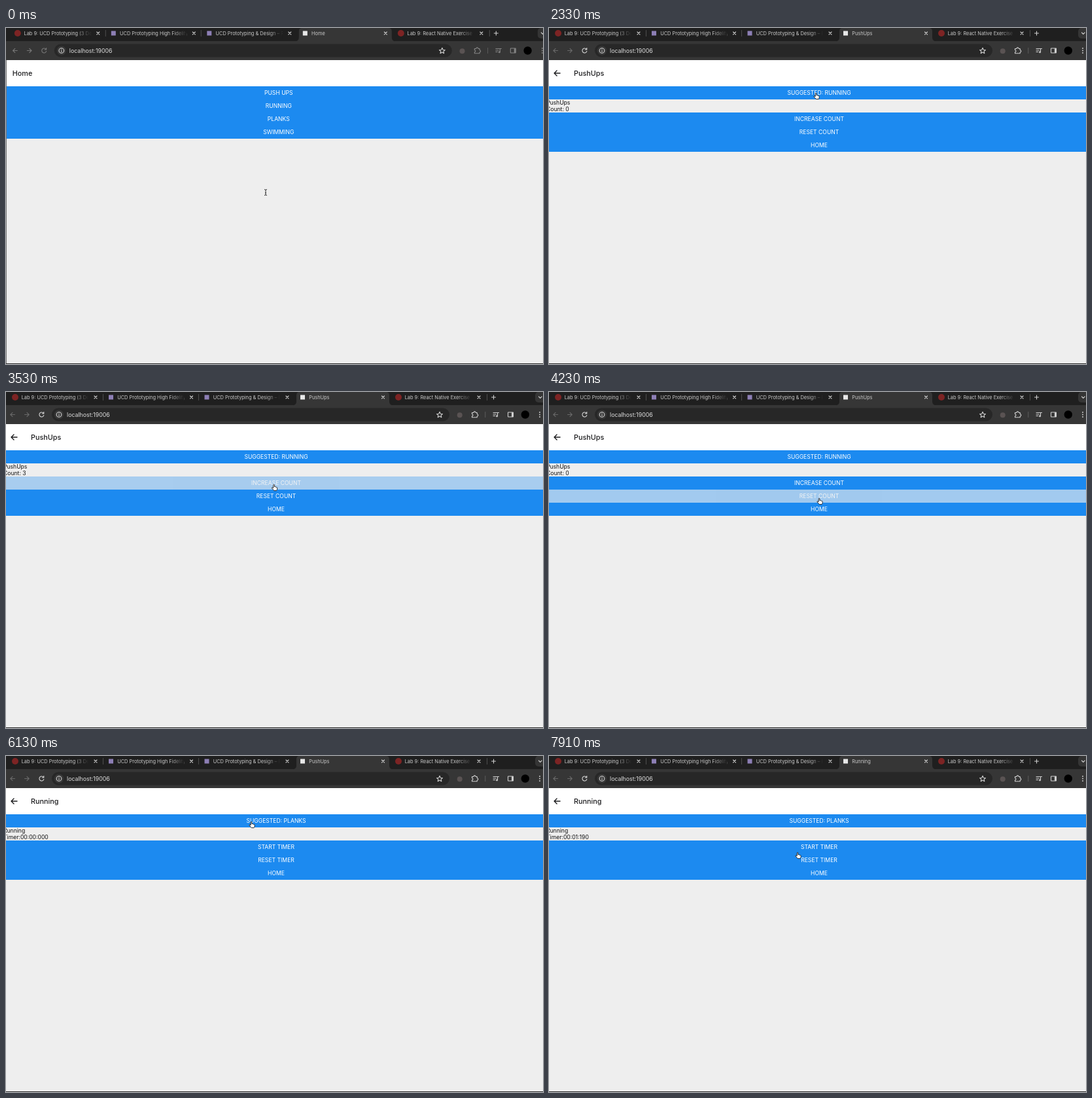
These frames come from a looping animation (821x513 px, 8 s). An HTML page:

```html
<!DOCTYPE html>
<html lang="en">
<head>
<meta charset="utf-8">
<title>Workout app</title>
<style>
  html, body { margin: 0; width: 100%; height: 100%; overflow: hidden; background: #eee; }
  svg { display: block; width: 821px; height: 513px; }
  text { font-family: Inter, Roboto, sans-serif; white-space: pre; }
  .tab { font-size: 7.4px; fill: #c9c9c9; }
  .url { font-size: 8.8px; fill: #dedede; }
  .head { font-size: 10.8px; font-weight: 500; fill: #1c1c1e; }
  .body { font-size: 8.6px; fill: #111; }
  .btn { font-size: 8.6px; fill: #fff; text-anchor: middle; }
  .line { fill: none; stroke: #d0d0d0; stroke-width: 1.1; stroke-linecap: round; stroke-linejoin: round; }
</style>
</head>
<body>
<svg viewBox="0 0 821 513" id="stage">
  <defs>
    <linearGradient id="fade">
      <stop offset="0" stop-color="#1f1f1f" stop-opacity="0"/>
      <stop offset="1" stop-color="#1f1f1f"/>
    </linearGradient>
  </defs>
  <rect width="821" height="513" fill="#eee"/>
  <rect width="821" height="21" fill="#1f1f1f"/>
  <rect y="20" width="821" height="29.5" fill="#363636"/>
  <g id="chrome">
    <path d="M438 20.5q6-.5 6-6V5q0-5 5-5h132q5 0 5 5v9.500q0 5.500 6 6z" fill="#363636"/>
    <g id="tabs"></g>
    <path class="line" d="M148.500 3.500v9M294.500 3.500v9M735.500 3.500v9" style="stroke:#4b4b4b"/>
    <path class="line" d="M742.500 8h6M745.500 5v6"/>
    <rect x="809" y="0" width="20" height="16" rx="5" fill="#353535"/>
    <path class="line" d="M814.500 7l2.300 2.300 2.300-2.300"/>
    <rect x="70" y="24.500" width="608" height="20" rx="10" fill="#272727"/>
    <circle cx="81" cy="34.500" r="7" fill="#383838"/>
    <g class="line">
      <g id="nav">
        <path d="M13.500 34.500h-6.500M10 31.300l-3.200 3.200 3.200 3.200"/>
        <path d="M28.500 34.500h6.500M32 31.300l3.200 3.200-3.200 3.200"/>
      </g>
      <path id="reload" d="M57.300 32.500a3.500 3.500 0 1 0 .5 3M57.800 30.500v2.500h-2.500"/>
      <circle cx="81" cy="34.500" r="3.800"/>
      <path d="M81 34.300v2M81 32.400v.1"/>
      <path d="M663 30.300l1.300 2.900 3.100.3-2.300 2.100.7 3.100-2.800-1.600-2.800 1.600.7-3.100-2.300-2.100 3.100-.3z"/>
    </g>
    <circle cx="693.700" cy="35.300" r="4" fill="#5a5353"/>
    <g class="line" id="tools">
      <path d="M712.500 31.500h2.500a1.600 1.600 0 0 1 3.200 0h2v2.300a1.600 1.600 0 0 1 0 3.200v1.800h-7.700v-2a1.500 1.500 0 0 0 0-3z"/>
      <path d="M745 31.500h5.500M745 34h4M745 36.500h2.500M751.500 36.500v-5h2"/>
      <circle cx="750.500" cy="36.800" r="1"/>
      <rect x="767.500" y="31" width="8" height="7" rx=".5"/>
      <path d="M773.500 31.500v6M774.500 31.500v6"/>
      <path d="M816 31v.1M816 34.500v.1M816 38v.1" stroke-width="1.900"/>
    </g>
    <path class="line" d="M732.700 30.500v8" style="stroke:#595959"/>
    <circle cx="793.800" cy="34.500" r="6.200" fill="#000"/>
    <text class="url" x="93" y="37.700">localhost:19006</text>
  </g>
  <rect y="49" width="821" height="40" fill="#fff"/>
  <g id="page"></g>
  <rect id="edge" y="49" width="1" height="464" fill="#777"/>
  <rect y="512" width="821" height="1" fill="#2b2b2b"/>
  <g id="ring" fill="none">
    <circle r="19" stroke="#fff" stroke-opacity=".5" stroke-width="2.600"/>
    <circle r="19" stroke="#252a30" stroke-width="1.400"/>
  </g>
  <path id="beam" d="M-2-4.500q2 0 2 1.200 0-1.200 2-1.200M0-3.500v7M-2 4.500q2 0 2-1.200 0 1.200 2 1.200M-1 .8h2" fill="none" stroke="#333" stroke-width="1"/>
  <path id="hand" d="M-1.600-4.500q1-.8 1.500.4v2.700q1.100-.6 1.400.4 1-.5 1.400.5 1.200-.4 1.400.8v1.900q-.2 1.300-1 2.400h-3.800q-1.500-1.800-3.300-3.700-.3-1.400 1.200-1l1 .8v-4.300q0-.7.200-.9z" fill="#fff" stroke="#1a1a1a" stroke-width=".9"/>
</svg>
<script>
const LOOP = 8000, BLUE = '#1c8af0';
const $ = id => document.getElementById(id);

function add(parent, tag, attrs, label) {
  const el = document.createElementNS('http://www.w3.org/2000/svg', tag);
  for (const key in attrs) el.setAttribute(key, attrs[key]);
  if (label !== undefined) el.textContent = label;
  parent.append(el);
  return el;
}

// Browser tabs
const tabs = [
  [14, '#7d2424', 'Lab 9: UCD Prototyping (3 Des'],
  [160.500, '#8d7fb5', 'UCD Prototyping High Fidelity'],
  [307, '#8d7fb5', 'UCD Prototyping & Design – F'],
  [453.500, '#e8e8e8', 'Home'],
  [600, '#7d2424', 'Lab 9: React Native Exercise']
];
let tabTitle;
tabs.forEach(([x, fill, label], i) => {
  const g = $('tabs');
  if (i % 4) add(g, 'rect', { x: x - 3.5, y: 4.5, width: 7, height: 7, fill });
  else add(g, 'circle', { cx: x, cy: 8, r: 5, fill });
  const text = add(g, 'text', { class: 'tab', x: x + 9.7, y: 10.7 }, label);
  if (i === 3) tabTitle = text;
  else {
    add(g, 'rect', { x: x + 91, y: 1, width: 21, height: 16, fill: 'url(#fade)' });
    add(g, 'rect', { x: x + 112, y: 1, width: 18, height: 16, fill: '#1f1f1f' });
  }
  add(g, 'path', { class: 'line', d: `M${x + 121} 6l4 4m0-4l-4 4` });
});

// App pages: each row is [top, label]
const pages = {
  Home: [[89, 'PUSH UPS'], [109, 'RUNNING'], [129, 'PLANKS'], [149, 'SWIMMING']],
  PushUps: [[89, 'SUGGESTED: RUNNING'], [129, 'INCREASE COUNT'], [149, 'RESET COUNT'], [169, 'HOME']],
  Running: [[89, 'SUGGESTED: PLANKS'], [129, 'START TIMER'], [149, 'RESET TIMER'], [169, 'HOME']]
};
const views = {};
for (const name in pages) {
  const root = add($('page'), 'g', {});
  const inner = add(root, 'g', {});
  const inside = name !== 'Home';
  const rows = pages[name].map(([y, label]) => {
    const row = add(inner, 'g', {});
    add(row, 'rect', { x: -10, y, width: 850, height: 20, fill: BLUE });
    add(row, 'text', { class: 'btn', x: 413, y: y + 13.1 }, label);
    return row;
  });
  add(inner, 'text', { class: 'head', x: inside ? 38 : 6, y: 73.3 }, name);
  let info;
  if (inside) {
    add(inner, 'path', { class: 'line', d: 'M17 69h-9M12 65l-4 4 4 4', style: 'stroke:#1c1c1e;stroke-width:1.4' });
    add(inner, 'text', { class: 'body', x: -4, y: 117.2 }, name);
    info = add(inner, 'text', { class: 'body', x: -4, y: 127.2 });
  }
  views[name] = { root, inner, rows, info };
}

// Presses: [time, page, row]; the action follows on release
const presses = [
  [1650, 'Home', 0], [2780, 'PushUps', 1], [3100, 'PushUps', 1], [3400, 'PushUps', 1],
  [4030, 'PushUps', 2], [5850, 'PushUps', 0], [6590, 'Running', 1]
];
const RELEASE = 130, TITLE_LAG = 240;

// Pointer stops: [time, x, y]
const path = [
  [0, 397, 251], [130, 397, 251], [900, 410, 107], [1600, 410, 106], [1900, 409, 104],
  [2350, 409, 104], [2700, 410.5, 146], [3550, 410.5, 146], [3950, 414, 167],
  [4500, 414, 167], [5400, 376, 105], [6200, 376, 105], [6550, 379, 141],
  [7600, 379, 141], [7910, 381, 152], [8000, 381, 152]
];

const clamp = v => Math.max(0, Math.min(1, v));
const ease = v => v * v * (3 - 2 * v);

function pointer(t) {
  const i = path.findIndex((p, n) => n && t <= p[0]);
  const a = path[i - 1], b = path[i];
  const k = ease((t - a[0]) / (b[0] - a[0]));
  return [a[1] + (b[1] - a[1]) * k, a[2] + (b[2] - a[2]) * k];
}

function rowOpacity(t, start) {
  const age = t - start;
  return 1 - .8 * (clamp((age - 30) / 120) - clamp((age - 150) / 250));
}

function pageAt(t) {
  return t < 1650 + RELEASE ? 'Home' : t < 5850 + RELEASE ? 'PushUps' : 'Running';
}

function clock(ms) {
  const pad = (n, len) => String(Math.floor(n)).padStart(len, '0');
  return `Timer:${pad(ms / 60000, 2)}:${pad(ms / 1000 % 60, 2)}:${pad(ms % 1000, 3)}`;
}

function tick(t) {
  if (t < 130) return 0;
  const lag = t < 7210 ? 30 : 10;
  return Math.floor((t - lag) / 100) * 100 + lag;
}

const show = (el, on) => el.style.display = on ? '' : 'none';
const move = (el, x, y) => el.setAttribute('transform', `translate(${x} ${y})`);

function draw(t) {
  const current = pageAt(t), shift = 3.8 * (1 - ease(clamp((t - 30) / 400)));
  move($('chrome'), shift, 0);
  show($('edge'), shift > 2);
  const focused = t >= 230;
  $('nav').style.stroke = focused ? '#696969' : '#777';
  $('reload').style.stroke = focused ? '#d5d5d5' : '#777';
  $('tools').style.stroke = focused ? '#d0d0d0' : '#858585';
  tabTitle.textContent = pageAt(t - TITLE_LAG);

  for (const name in views) {
    const view = views[name];
    show(view.root, name === current);
    move(view.inner, shift, 0);
    view.rows.forEach((row, i) => {
      row.style.opacity = Math.min(1, ...presses
        .filter(p => p[1] === name && p[2] === i).map(p => rowOpacity(t, p[0])));
    });
  }
  const reset = t >= 4030 + RELEASE;
  const count = reset ? 0 : presses.filter(p => p[1] === 'PushUps' && p[2] === 1 && t >= p[0] + RELEASE).length;
  views.PushUps.info.textContent = 'Count: ' + count;
  views.Running.info.textContent = clock(Math.max(0, t - 6590 - RELEASE));

  const [x, y] = pointer(t), hand = y < 189;
  show($('hand'), hand);
  show($('beam'), !hand);
  move($(hand ? 'hand' : 'beam'), x, y);
  show($('ring'), presses.some(p => t >= p[0] && t < p[0] + RELEASE));
  move($('ring'), x - 1, y - 4);
}

const start = performance.now();
function loop() {
  draw(tick((performance.now() - start) % LOOP));
  requestAnimationFrame(loop);
}
loop();
</script>
</body>
</html>
```
